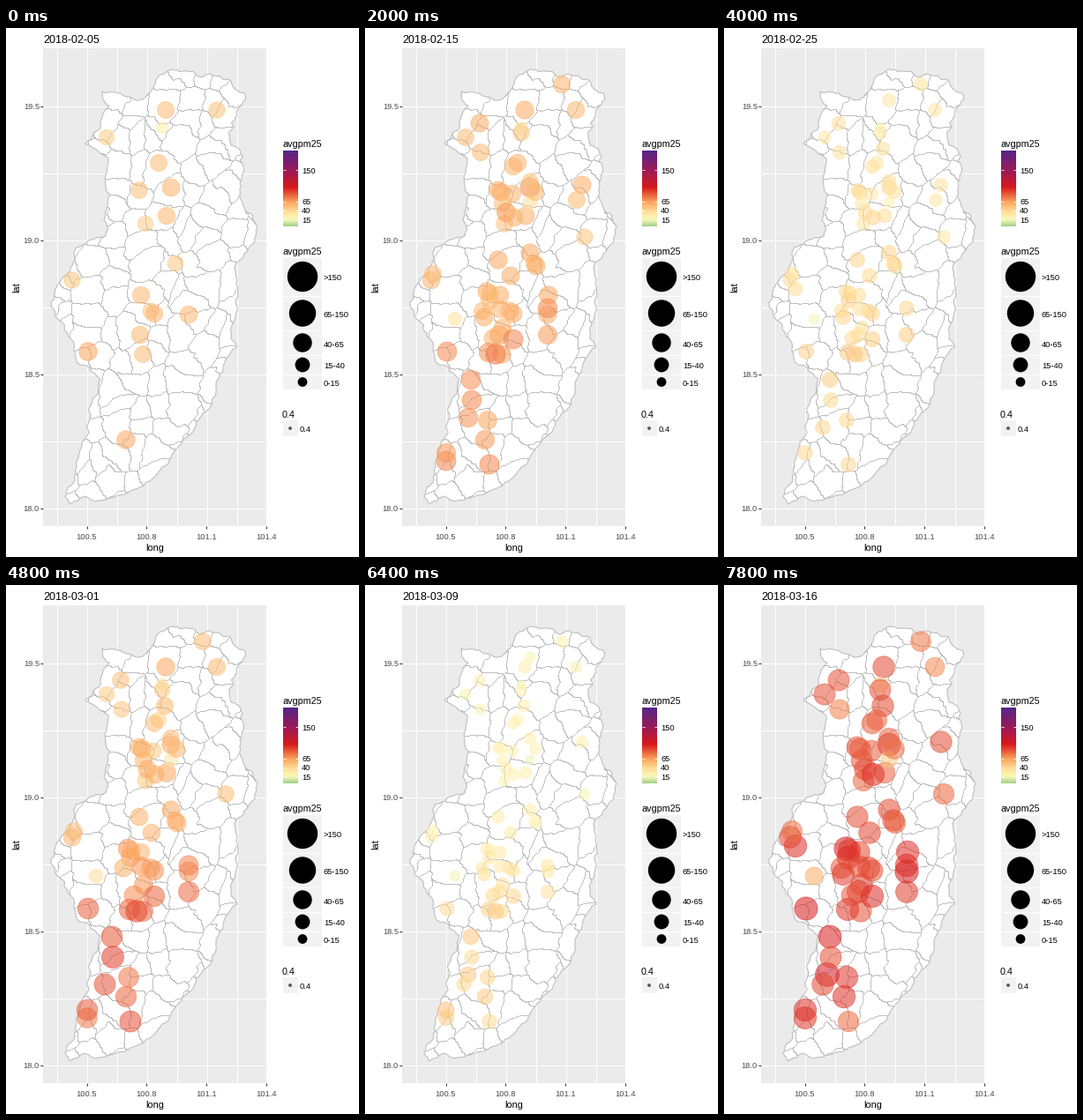
Write a matplotlib script that moves like this. It is 400 px wide and 600 px high and loops after 8000 ms.

```python
import numpy as np
import matplotlib.pyplot as plt
from matplotlib.animation import FuncAnimation
from matplotlib.colors import LinearSegmentedColormap, to_rgba
from matplotlib.patches import Circle, Polygon, Rectangle

plt.rcParams["font.family"] = "Liberation Sans"
W, H, DPI = 400, 600, 100
DAYS, STEP = 40, 200
PX = 72 / DPI
X0, Y0, X1, Y1 = 42, 23, 295, 565
GREY = "#BEBEBE"
ALPHA = 0.55
rng = np.random.default_rng(5)

# corners of the province, clockwise from the top
CORNERS = [
    (183, 49), (205, 49), (231, 52), (252, 58), (259, 69), (270, 74), (268, 86),
    (259, 104), (255, 133), (268, 146), (266, 180), (270, 204), (285, 225),
    (270, 256), (261, 290), (262, 320), (262, 362), (245, 391), (238, 403),
    (223, 437), (212, 458), (191, 480), (177, 498), (159, 515), (125, 531),
    (88, 531), (73, 540), (67, 531), (78, 512), (82, 488), (90, 465), (104, 415),
    (107, 398), (79, 374), (66, 342), (55, 307), (58, 292), (67, 281), (77, 254),
    (94, 241), (113, 236), (112, 215), (118, 189), (116, 148), (90, 131),
    (105, 116), (117, 88), (109, 72), (132, 76), (155, 81), (168, 65)]

# ordered by how they report: see IRREGULAR, EARLY and CLEAN
STATIONS = np.array([
    (187, 82), (240, 195), (246, 178), (208, 303), (117, 442), (112, 453),
    (92, 491), (81, 296), (136, 467), (181, 93), (239, 93), (114, 124),
    (173, 153), (187, 181), (151, 184), (158, 222), (182, 213), (192, 267),
    (75, 286), (153, 303), (164, 321), (168, 324), (152, 348), (155, 370),
    (207, 325), (93, 367), (177, 113), (187, 198), (102, 330), (223, 64),
    (177, 119), (180, 137), (130, 108), (131, 141), (168, 157), (187, 174),
    (193, 186), (167, 188), (154, 186), (156, 199), (160, 209), (169, 215),
    (249, 237), (187, 255), (194, 270), (151, 263), (165, 281), (77, 279),
    (138, 299), (142, 301), (141, 309), (133, 321), (135, 328), (153, 319),
    (156, 340), (145, 352), (168, 353), (140, 368), (148, 370), (207, 318),
    (207, 348), (120, 399), (121, 422), (139, 445), (92, 482), (141, 495)])
N = len(STATIONS)
IRREGULAR, EARLY, CLEAN = slice(0, 10), slice(8, 27), slice(26, 29)

# mean level on key days in the north, the middle and the south
KEY_DAYS = [0, 10, 16, 20, 28, 32, 39]
NORTH = [55, 58, 60, 37, 68, 25, 84]
MIDDLE = [57, 62, 62, 40, 88, 29, 96]
SOUTH = [58, 70, 60, 43, 128, 45, 95]
BANDS = [100, 300, 400]

STOPS = [(0, "#A3D08A"), (15, "#EDF3B4"), (25, "#FFF3B0"), (40, "#FEDC95"),
         (65, "#FCA55D"), (105, "#D7191C"), (150, "#9C1A58"), (203, "#542788")]
TOP = STOPS[-1][0]
cmap = LinearSegmentedColormap.from_list("pm", [(v / TOP, c) for v, c in STOPS], 512)


def make_values():
    bands = np.array([np.interp(range(DAYS), KEY_DAYS, b) for b in (NORTH, MIDDLE, SOUTH)])
    values = np.array([np.interp(STATIONS[:, 1], BANDS, day) for day in bands.T])
    values *= rng.normal(1, 0.06, N) * rng.normal(1, 0.06, (DAYS, N))
    values[:, CLEAN] *= 0.58
    return values


def make_reports():
    """Which stations report on each day."""
    start = rng.integers(1, 9, N)
    start[EARLY] = 0
    chance = np.full(N, 0.98)
    chance[IRREGULAR] = 0.6
    on = (np.arange(DAYS)[:, None] >= start) & (rng.random((DAYS, N)) < chance)
    on[0] = start == 0
    return on


def rough(points, depth=3, amount=0.11):
    """Crinkle a polyline by moving midpoints sideways."""
    p = np.array(points, float)
    for _ in range(depth):
        d = np.diff(p, axis=0)
        side = np.column_stack([-d[:, 1], d[:, 0]])
        mid = p[:-1] + d / 2 + side * rng.normal(0, amount, (len(d), 1))
        out = np.empty((len(p) + len(mid), 2))
        out[::2], out[1::2] = p, mid
        p = out
    return p


def ripple(x, y):
    """Smooth noise, from long waves to short ones."""
    total = 0
    for length in (60, 38, 24, 15, 10, 7):
        angle, phase = rng.uniform(0, 2 * np.pi, 2)
        wave = x * np.cos(angle) + y * np.sin(angle)
        total = total + 0.055 * length * np.sin(2 * np.pi * wave / length + phase)
    return total


def district_edges(size=27):
    """Edges between the cells of a jittered grid, as a pixel mask."""
    y, x = np.mgrid[0:H, 0:W].astype(float)
    wx, wy = x + ripple(x, y), y + ripple(x, y)
    best = np.full((H, W), np.inf)
    label = np.zeros((H, W), int)
    sites = [(sx, sy) for sx in range(X0, X1, size) for sy in range(Y0, Y1, size)]
    for i, site in enumerate(sites):
        sx, sy = site + rng.uniform(-0.42, 0.42, 2) * size
        dist = (wx - sx) ** 2 + (wy - sy) ** 2
        near = dist < best
        best[near], label[near] = dist[near], i
    edges = np.zeros((H, W), bool)
    edges[:, 1:] |= label[:, 1:] != label[:, :-1]
    edges[1:] |= label[1:] != label[:-1]
    return edges


fig = plt.figure(figsize=(W / DPI, H / DPI), dpi=DPI, facecolor="white")
ax = fig.add_axes([0, 0, 1, 1])
ax.set(xlim=(0, W), ylim=(H, 0))
ax.axis("off")


def text(x, y, s, size=9.3, **kw):
    kw.setdefault("va", "center_baseline")
    return ax.text(x, y, s, fontsize=size * PX, **kw)


def line(xs, ys, color="white", width=1, **kw):
    ax.plot(xs, ys, color=color, lw=width * PX, solid_capstyle="butt", **kw)


def box(x, y, w, h, color):
    ax.add_patch(Rectangle((x, y), w, h, fc=color, lw=0))


def draw_panel():
    box(X0, Y0, X1 - X0, Y1 - Y0, "#EBEBEB")
    for i in range(7):
        x, y = 57.5 + 34 * i, 88.5 + 76 * i
        line([x, x], [Y0, Y1])
        line([X0, X1], [y, y])
    for i in range(4):
        x, y = 91.5 + 67.8 * i, 88.5 + 152 * i
        line([x, x], [Y1, Y1 + 3], "#333333")
        line([X0 - 3, X0], [y, y], "#333333")
        text(x, 576, f"{100.5 + 0.3 * i:.1f}", color="#4D4D4D", ha="center")
        text(38, y, f"{19.5 - 0.5 * i:.1f}", color="#4D4D4D", ha="right")
    text(169, 589, "long", 11, ha="center")
    text(12, 294, "lat", 11, ha="center", va="center", rotation=90)


def draw_map():
    border = rough(CORNERS + CORNERS[:1])
    land = ax.add_patch(Polygon(border, fc="white", lw=0, zorder=2))
    mask = np.zeros((H, W, 4))
    mask[district_edges()] = to_rgba(GREY)
    edges = ax.imshow(mask, extent=(0, W, H, 0), aspect="auto",
                      interpolation="nearest", zorder=3)
    edges.set_clip_path(land)
    line(border[:, 0], border[:, 1], GREY, 1.1, zorder=3)


def draw_legends():
    text(313, 131, "avgpm25", 10.7)
    ax.imshow(np.linspace(1, 0, 256)[:, None], cmap=cmap, vmin=0, vmax=1,
              extent=(314, 331, 225, 139), aspect="auto", zorder=2)
    for v in (15, 40, 65, 150):
        y = 223.5 - 0.415 * v
        line([314, 317.4], [y, y], width=0.8, zorder=3)
        line([327.6, 331], [y, y], width=0.8, zorder=3)
        text(335, y, str(v))

    text(313, 253, "avgpm25", 10.7)
    y = 260
    for height, r, s in ((44, 17.2, ">150"), (39, 15.2, "65-150"), (28, 10.7, "40-65"),
                         (22, 8.4, "15-40"), (17, 5.4, "0-15")):
        box(314, y, 44, height, "#F2F2F2")
        line([314, 358], [y, y], width=0.9)
        mid = y + height / 2
        ax.add_patch(Circle((336, mid), r, fc="black", lw=0, zorder=3))
        text(360, mid + 1, s)
        y += height

    text(313, 438, "0.4", 10.7)
    box(314, 445, 17, 18, "#F2F2F2")
    shade = (0, 0, 0, ALPHA)
    ax.add_patch(Circle((322, 454), 1.5, fc=shade, ec=shade, lw=0.9 * PX, zorder=3))
    text(333, 455, "0.4")


values, reports = make_values(), make_reports()
draw_panel()
draw_map()
draw_legends()
ax.set(xlim=(0, W), ylim=(H, 0))
title = text(42, 17, "", 12.5, va="baseline")
dots = ax.scatter([], [], linewidths=0.8 * PX, zorder=5)


def update(day):
    month, date = (2, day + 5) if day < 24 else (3, day - 23)
    title.set_text(f"2018-{month:02d}-{date:02d}")
    on = reports[day]
    v = values[day, on]
    radius = 1.28 * np.sqrt(v)
    colors = cmap(v / TOP)
    colors[:, 3] = ALPHA
    dots.set_offsets(STATIONS[on])
    dots.set_sizes((2 * radius * PX) ** 2)
    dots.set_facecolors(colors)
    dots.set_edgecolors(colors)
    return title, dots


anim = FuncAnimation(fig, update, frames=DAYS, interval=STEP,
                     init_func=lambda: update(0), repeat=True, repeat_delay=0)
plt.show()
```
